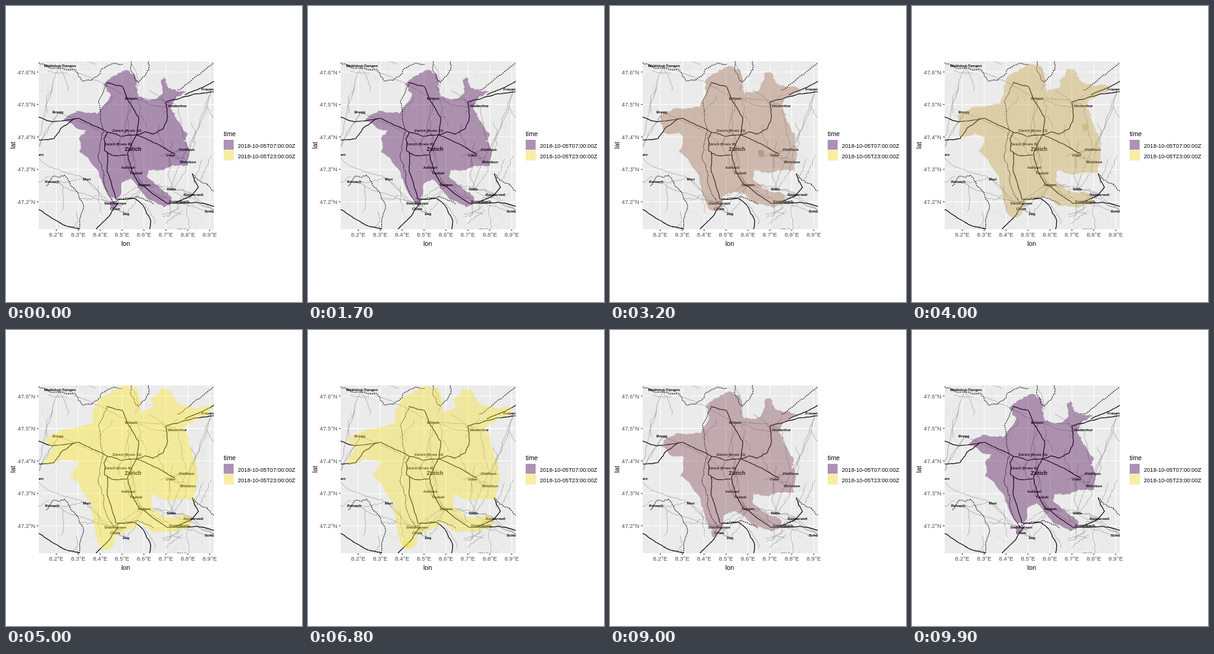
An HTML page with a canvas that plays this animation: 480 by 480 pixels, repeating every 10 s.

```html
<!DOCTYPE html>
<html lang="en">
<head>
<meta charset="utf-8">
<title>Travel time area</title>
<style>
html, body { margin: 0; width: 100%; height: 100%; overflow: hidden; background: #fff; }
canvas { display: block; width: 480px; height: 480px; }
</style>
</head>
<body>
<canvas id="stage" width="480" height="480"></canvas>
<script>
const SANS = '"Liberation Sans", Arial, sans-serif';
const PANEL = [53, 90, 284, 272];
const EARLY = [68, 1, 84], LATE = [253, 231, 37];
const ALPHA = 0.4;
const view = document.getElementById('stage').getContext('2d');
const base = document.createElement('canvas');
base.width = base.height = 480;
const g = base.getContext('2d');

function seeded(s) {
  return () => (s = (s * 16807) % 2147483647) / 2147483647;
}

function pairs(list) {
  return list.flatMap((v, i) => i % 2 ? [] : [[v, list[i + 1]]]);
}

// Midpoint displacement: each pass halves the edges and shifts the new points.
function roughen(pts, amp, passes, rnd, closed) {
  for (; passes > 0; passes--, amp *= 0.65) {
    pts = pts.flatMap((a, i) => {
      const b = pts[i + 1] || (closed && pts[0]);
      if (!b) return [a];
      const shift = [rnd() - 0.5, rnd() - 0.5];
      return [a, a.map((v, c) => (v + b[c]) / 2 + shift[c % 2] * 2 * amp)];
    });
  }
  return pts;
}

// Matching corners of the reachable area, clockwise from the north.
const morning = pairs([
  180,112, 193,104, 209,112, 210,129, 216,148, 232,153, 254,142, 251,122, 255,114, 261,128, 268,134,
  276,138, 296,140, 276,149, 268,168, 277,185, 295,207, 288,219, 298,237, 295,259, 262,262, 234,267,
  228,276, 247,291, 264,307, 269,319, 256,326, 229,313, 214,295, 203,280, 188,286, 183,310, 166,306,
  150,268, 119,237, 118,214, 131,200, 110,194, 85,186, 98,180, 117,170, 148,175, 170,144, 158,127
]);
const night = pairs([
  168,104, 188,91, 211,93, 217,122, 221,136, 240,125, 234,112, 250,96, 263,96, 275,115, 303,126,
  339,124, 322,140, 290,157, 294,168, 298,190, 306,208, 310,232, 309,252, 305,276, 269,277, 238,267,
  235,285, 258,303, 292,301, 305,314, 272,328, 240,329, 215,312, 200,325, 179,332, 170,354, 152,352,
  138,282, 103,235, 118,214, 92,208, 62,217, 76,192, 61,178, 92,161, 140,152, 140,134, 150,113
]);
const outline = roughen(morning.map((a, i) => [...a, ...night[i]]), 3, 3, seeded(4711), true);

function patch(cx, cy) {
  const rnd = seeded(99);
  return Array.from({ length: 16 }, (_, i) => {
    const a = i / 8 * Math.PI, r = 4.5 + rnd() * 3;
    return [cx + Math.cos(a) * r, cy + Math.sin(a) * r];
  });
}

// Colour blending in CIE Lab.
const WHITE = [0.95047, 1, 1.08883];
function toLab(rgb) {
  const [r, gr, b] = rgb.map(v => (v /= 255) > 0.04045 ? ((v + 0.055) / 1.055) ** 2.4 : v / 12.92);
  const [x, y, z] = [
    0.4124 * r + 0.3576 * gr + 0.1805 * b,
    0.2126 * r + 0.7152 * gr + 0.0722 * b,
    0.0193 * r + 0.1192 * gr + 0.9505 * b
  ].map((v, i) => (v /= WHITE[i]) > 0.008856 ? Math.cbrt(v) : 7.787 * v + 16 / 116);
  return [116 * y - 16, 500 * (x - y), 200 * (y - z)];
}
function toRgb([L, a, b]) {
  const fy = (L + 16) / 116;
  const [x, y, z] = [fy + a / 500, fy, fy - b / 200]
    .map((f, i) => WHITE[i] * (f ** 3 > 0.008856 ? f ** 3 : (f - 16 / 116) / 7.787));
  return [
    3.2406 * x - 1.5372 * y - 0.4986 * z,
    -0.9689 * x + 1.8758 * y + 0.0415 * z,
    0.0557 * x - 0.204 * y + 1.057 * z
  ].map(v => {
    v = v > 0.0031308 ? 1.055 * v ** (1 / 2.4) - 0.055 : 12.92 * v;
    return Math.round(255 * Math.min(1, Math.max(0, v)));
  });
}
const labA = toLab(EARLY), labB = toLab(LATE);
const tint = rgb => `rgba(${rgb},${ALPHA})`;

function text(str, x, y, size, align = 'center', color = '#000', weight = '') {
  g.font = `${weight} ${size}px ${SANS}`;
  g.textAlign = align;
  g.fillStyle = color;
  g.fillText(str, x, y);
}

function line(width, color, pts, dash = []) {
  g.lineWidth = width;
  g.strokeStyle = color;
  g.setLineDash(dash);
  g.beginPath();
  pts.forEach(([x, y]) => g.lineTo(x, y));
  g.stroke();
  g.setLineDash([]);
}

const wobble = seeded(31);
const road = (...p) => line(1.2, '#000', roughen(pairs(p), 1.2, 3, wobble));
const border = (...p) => line(1.1, '#000', roughen(pairs(p), 3, 3, wobble), [2, 1.4]);
const lane = (a, b, color) => line(0.6, color, roughen([a, b], 5, 4, wobble));

const towns = [
  ['Waldshut-Tiengen', 87.5, 97], ['Bülach', 203, 150], ['Winterthur', 278, 162], ['Brugg', 84, 172],
  ['Zürich (Kreis 11)', 196, 202], ['Zürich (Kreis 9)', 181, 224], ['Zürich', 206, 232.5],
  ['Pfäffikon', 293, 233], ['Uster', 267, 242], ['Wetzikon', 295, 253], ['Adliswil', 198, 262],
  ['Thalwil', 211, 271], ['Horgen', 224, 290], ['Stäfa', 268, 297], ['Rapperswil', 304, 306],
  ['Freienbach', 281, 317], ['Steinhausen', 177, 320], ['Cham', 177, 328.5], ['Zug', 194.5, 337],
  ['Reinach', 75, 285], ['Muri', 131, 281], ['Frauenfeld', 332, 135], ['Schübelbach', 341, 333],
  ['Gränichen', 46, 241]
];

// Faint country roads, then darker ones heading roughly north-south.
function drawLanes() {
  const rnd = seeded(2018);
  for (let i = 0; i < 90; i++) {
    const x = 53 + rnd() * 284, y = 90 + rnd() * 272, a = rnd() * Math.PI;
    const len = i < 60 ? 25 : 45;
    const end = [x + Math.cos(a) * len * 0.7, y + Math.sin(a) * len];
    lane([x, y], end, i < 60 ? '#dcdcdc' : '#888');
  }
  towns.forEach(([, x, y]) => {
    const near = towns
      .map(t => [Math.hypot(t[1] - x, t[2] - y), t[1], t[2]])
      .sort((a, b) => a[0] - b[0]);
    for (const t of near.slice(2, 4)) lane([x, y], t.slice(1), '#888');
  });
}

function drawRoads() {
  road(53,180, 75,188, 118,182, 142,194, 165,205, 185,211, 212,209);
  road(53,217, 78,215, 92,196, 110,183);
  road(163,124, 188,130, 199,155, 215,180, 212,209);
  road(212,209, 225,204, 238,208, 255,199, 262,180, 259,156, 281,150, 304,143, 337,139);
  road(290,144, 306,137, 337,122);
  road(165,205, 159,214, 160,235, 172,242, 196,242);
  road(164,238, 164,268, 178,313, 208,312);
  road(212,209, 197,240, 204,268, 217,289, 245,309, 262,320, 308,318, 337,325);
  road(212,209, 248,225, 274,240);
  road(182,318, 168,340, 146,362);
  road(53,330, 74,344, 98,357, 120,362);
  road(208,312, 223,325, 234,345, 233,362);
  road(302,272, 312,294, 296,310, 275,318);
}

function drawBorders() {
  border(53,92, 70,100, 112,103, 126,122, 148,114, 166,96, 190,94);
  border(203,90, 208,118, 214,124, 230,104, 232,90);
  border(166,124, 150,155, 158,204, 149,245, 159,275, 165,305, 174,318);
  border(66,292, 75,277, 95,275, 110,295, 126,325, 118,362);
  border(174,318, 212,309, 240,322);
  border(278,136, 303,118, 337,92);
  border(302,272, 325,288, 337,300);
  border(262,362, 292,361);
}

function drawBase() {
  g.fillStyle = '#fff';
  g.fillRect(0, 0, 480, 480);
  const xs = i => 81.5 + i * 35.55, ys = i => 107 + i * 52.65;
  g.save();
  g.beginPath();
  g.rect(...PANEL);
  g.clip();
  g.fillStyle = '#ebebeb';
  g.fillRect(...PANEL);
  for (let i = 0; i < 8; i++) line(1.07, '#fff', [[xs(i), 90], [xs(i), 362]]);
  for (let i = 0; i < 5; i++) line(1.07, '#fff', [[53, ys(i)], [337, ys(i)]]);
  g.lineJoin = 'round';
  drawLanes();
  drawBorders();
  drawRoads();
  for (const [name, x, y] of towns)
    text(name, x, y + 2, name === 'Zürich' ? 8.8 : 6, 'center', '#000', 'bold');
  g.restore();

  for (let i = 0; i < 8; i++) {
    line(1, '#333', [[xs(i), 362], [xs(i), 365]]);
    text(`8.${i + 2}°E`, xs(i), 374, 9.5, 'center', '#4d4d4d');
  }
  for (let i = 0; i < 5; i++) {
    line(1, '#333', [[50, ys(i)], [53, ys(i)]]);
    text(`47.${6 - i}°N`, 47.5, ys(i) + 3.5, 9.3, 'right', '#4d4d4d');
  }
  text('lon', 194, 388.5, 10.6);
  g.save();
  g.translate(15, 226);
  g.rotate(-Math.PI / 2);
  text('lat', 0, 0, 10.6);
  g.restore();

  text('time', 353, 210.5, 10.3, 'left');
  [['07', EARLY], ['23', LATE]].forEach(([hour, rgb], i) => {
    const y = 217 + i * 17;
    g.fillStyle = '#f2f2f2';
    g.fillRect(353, y, 17, 17);
    g.fillStyle = tint(rgb);
    g.fillRect(353, y, 16, 16);
    text(`2018-10-05T${hour}:00:00Z`, 376, y + 12.6, 9.1, 'left');
  });
}

function fillShape(pts) {
  view.beginPath();
  pts.forEach(([x, y]) => view.lineTo(x, y));
  view.closePath();
  view.fill();
}

function draw(ms) {
  const n = Math.floor((ms % 10000) / 100);
  const rising = n < 50;
  const p = rising ? Math.max(0, (n - 16) / 34) : Math.min(1, 1 - (n - 67) / 33);
  const mix = (a, b) => a + (b - a) * p;

  view.drawImage(base, 0, 0);
  view.save();
  view.beginPath();
  view.rect(...PANEL);
  view.clip();
  view.fillStyle = tint(toRgb(labA.map((v, i) => mix(v, labB[i]))));
  fillShape(outline.map(q => [mix(q[0], q[2]), mix(q[1], q[3])]));
  // A detached patch travels on its own and darkens where it overlaps.
  if (p < 1) fillShape(rising
    ? patch(mix(174, 326), mix(322, 145))
    : patch(mix(174, 160), mix(322, 348)));
  view.restore();
}

drawBase();
const start = performance.now();
function tick() {
  draw(performance.now() - start);
  requestAnimationFrame(tick);
}
tick();
</script>
</body>
</html>
```
